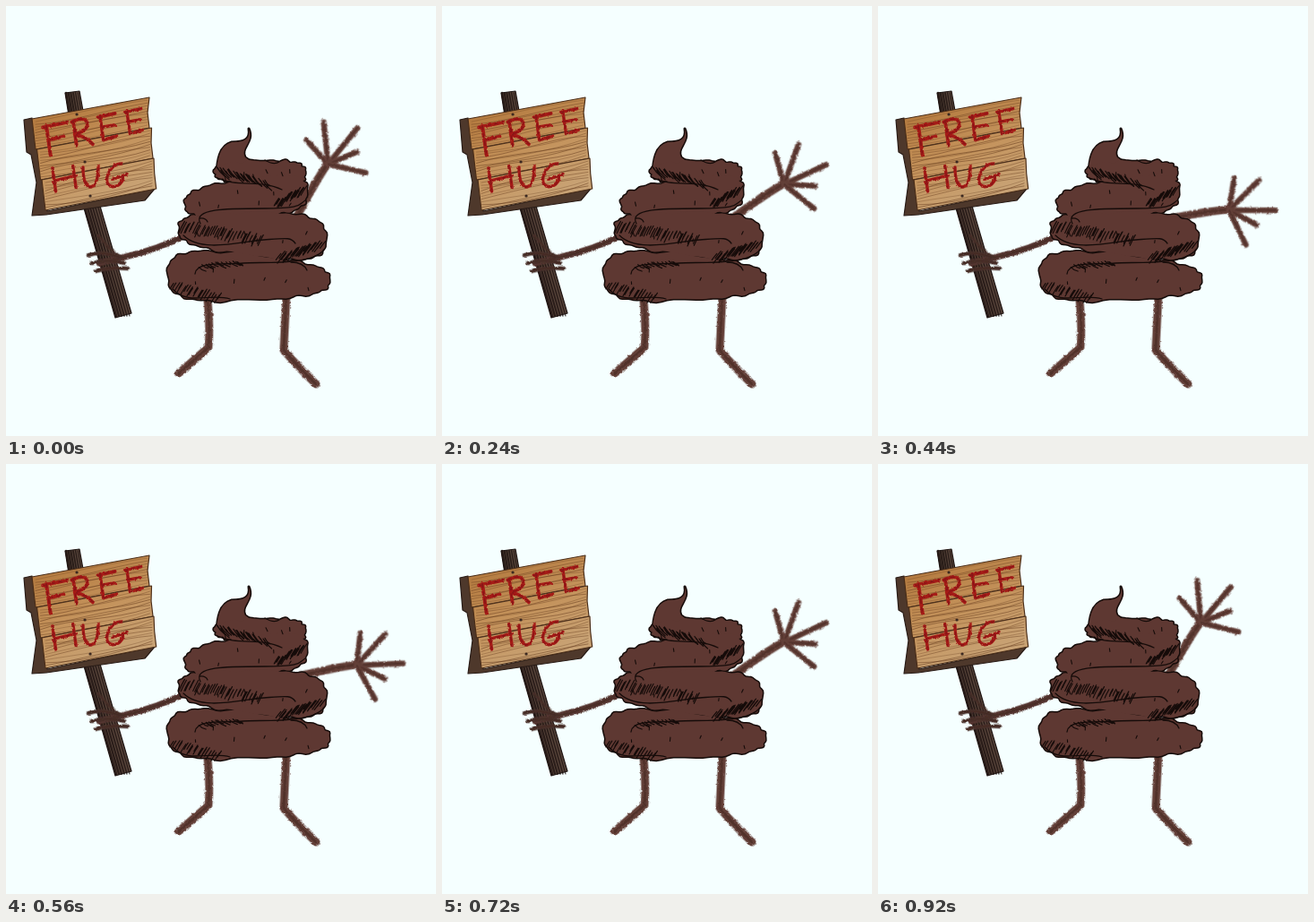
Animation of 480 by 480 pixels, one loop 960 ms. Source, as an HTML page:

```html
<!DOCTYPE html>
<html lang="en">
<head>
<meta charset="utf-8">
<title>Free hug</title>
<style>
html, body { margin: 0; width: 100%; height: 100%; overflow: hidden; background: #f5ffff; }
svg { display: block; width: 100vw; height: 100vh; }
path { stroke-linecap: round; stroke-linejoin: round; }
</style>
</head>
<body>
<svg viewBox="0 0 480 480">
  <defs>
    <filter id="chalk" filterUnits="userSpaceOnUse" x="0" y="0" width="480" height="480">
      <feTurbulence type="fractalNoise" baseFrequency=".3" numOctaves="2" seed="4"/>
      <feDisplacementMap in="SourceGraphic" scale="3" xChannelSelector="R" yChannelSelector="G"/>
      <feGaussianBlur stdDeviation=".6"/>
    </filter>
    <linearGradient id="wood" gradientUnits="userSpaceOnUse" x1="70" y1="115" x2="115" y2="215">
      <stop offset="0" stop-color="#b67d42"/>
      <stop offset=".5" stop-color="#c4935c"/>
      <stop offset="1" stop-color="#c8a274"/>
    </linearGradient>
  </defs>
  <g id="pole"></g>
  <g id="sign"></g>
  <g id="paint" filter="url(#chalk)" aria-label="FREE HUG"></g>
  <g id="limbs" filter="url(#chalk)"></g>
  <g id="wave"><g id="hand" filter="url(#chalk)"></g></g>
  <g id="body"></g>
</svg>
<script>
const $ = id => document.getElementById(id);
const INK = '#150b09', BROWN = '#5e3832', LIMB = '#633f38', GRIP = '#48302a', RED = '#a51a18';

let seed = 11;
const rnd = () => (seed = (seed * 16807) % 2147483647) / 2147483647;
const jit = a => (rnd() - .5) * 2 * a;
const mix = (a, b, t) => a + (b - a) * t;

function draw(id, d, stroke, width = 1, fill = 'none', opacity = 1) {
  const p = document.createElementNS('http://www.w3.org/2000/svg', 'path');
  const attrs = { d, stroke, 'stroke-width': width, fill, opacity };
  for (const k in attrs) p.setAttribute(k, attrs[k]);
  $(id).append(p);
  return p;
}

// Square post with grain along its length
function post(x0, y0, x1, y1, w) {
  draw('pole', `M${x0},${y0}l${w},-2L${x1 + w},${y1 - 5} ${x1},${y1}Z`, '#1d1311', 1.2, '#57443a');
  for (let i = 0; i < 6; i++) {
    const k = w * i / 6 + 1;
    draw('pole', `M${x0 + k},${y0}L${x1 + k},${y1 - 2}`, '#211613', 2.4 - i * .25, 'none', .85);
  }
}

function plank(i) {
  const l = 29 + 5.5 * i, r = 160 + 2.5 * i, top = 126 + 34 * i, h = 34, rise = -24;
  draw('sign', `M${l},${top}L${r},${top + rise}l${jit(2)},${h / 2} 2,${h / 2}L${l + 4},${top + h}Z`,
    '#4a2d18', 1.2, 'url(#wood)');
  for (let n = 1; n < 11; n++) {
    const y = top + h * n / 11, span = r - l - 6;
    draw('sign', `M${l + 4},${y}c${span * .3},${rise * .3 + jit(7)} ${span * .65},${rise * .65 + jit(7)} ${span},${rise}`,
      '#63391c', .5 + rnd() * .5, 'none', .55);
  }
}

// Letter strokes in a 24 by 32 box
const GLYPHS = {
  F: 'M1,0L0,33M-3,1L24,0M1,16L18,15',
  R: 'M1,0L0,29M-1,1Q15,-4 17,5 17,14 0,16Q12,20 19,31',
  E: 'M1,0L0,30M-2,1L20,0M1,14L17,14M0,30L17,28',
  H: 'M1,0L0,31M-1,17L30,15M28,2L27,31',
  U: 'M0,0Q-4,22 4,27 15,29 20,2',
  G: 'M21,0Q7,-2 -1,13 -6,26 5,28 17,28 20,15M5,18L25,15'
};

function letter(name, x, y, size) {
  const place = `translate(${x} ${y}) rotate(-10) scale(${size})`;
  draw('paint', GLYPHS[name], RED, 4).setAttribute('transform', place);
  const dry = draw('paint', GLYPHS[name], '#7c1112', 1.5, 'none', .7);
  dry.setAttribute('transform', place);
  dry.setAttribute('stroke-dasharray', '4 5');
}

function buildSign() {
  post(66, 97, 70, 122, 16);
  post(86, 222, 122, 348, 18);
  draw('sign', 'M20,127L29,125 46,229 166,204 155,217 45,233 29,234 34,197 28,166 23,163Z',
    '#281b16', 1.2, '#4e382b');
  for (let i = 0; i < 3; i++) plank(i);
  draw('sign', 'M79,121h.1M88,174h.1M94,212h.1', '#3b2820', 3.2);
  [...'FREE'].forEach((c, i) => letter(c, 44 + 30 * i, 134 - 5.5 * i, 1 - .05 * i));
  [...'HUG'].forEach((c, i) => letter(c, [51, 86, 112][i], 181 - i, .85));
}

function limb(id, d, width, color = LIMB) {
  draw(id, d, color, width + 2, 'none', .45);
  draw(id, d, color, width);
  draw(id, d, '#40251f', width * .35, 'none', .5);
}

function buildLimbs() {
  limb('limbs', 'M225,328Q228,356 226,381L193,410', 8);
  limb('limbs', 'M313,322L310,384Q325,402 346,422', 8);
  limb('limbs', 'M202,255Q170,272 129,281L104,287', 6, '#553630');
  limb('limbs', 'M103,256Q114,271 128,280', 2, GRIP);
  for (let i = 0; i < 3; i++)
    limb('limbs', `M${92 + 4 * i},${278 + 9 * i}q17,-5 36,${3 - 3 * i}`, 3.5, GRIP);

  limb('hand', 'M322,238L345,234Q368,230 393,228', 8);
  const fingers = [[-80, 36], [-44, 47], [1, 52], [29, 35], [65, 43]];
  for (const [deg, len] of fingers) {
    const a = deg * Math.PI / 180;
    limb('hand', `M392,229l${len * Math.cos(a)},${len * Math.sin(a)}`, 5.5);
  }
}

// Coils, top to bottom: each end has x, centre y and half height
const COILS = [
  { l: [233, 185, 11], r: [334, 187, 15] },
  { l: [200, 221, 17], r: [336, 207, 25] },
  { l: [193, 249, 19], r: [357, 260, 29] },
  { l: [181, 300, 32], r: [361, 306, 18] }
];
const along = (c, t) => c.l.map((v, i) => mix(v, c.r[i], t));

// Lumpy superellipse
function coilPath(c) {
  const pow = v => Math.sign(v) * Math.abs(v) ** (2 / 3);
  const phase = rnd() * 6;
  let d = '';
  for (let i = 0; i < 120; i++) {
    const a = i / 120 * 2 * Math.PI, lump = Math.sin(a * 13 + phase) + Math.sin(a * 22 + phase * 2);
    const [x, y, h] = along(c, (1 + pow(Math.cos(a))) / 2);
    d += `${i ? 'L' : 'M'}${x + lump * .7 * Math.cos(a)},${y + pow(Math.sin(a)) * h + lump * .9 * Math.sin(a)}`;
  }
  return d + 'Z';
}

// Row of n pen strokes starting along a line, each running by (dx, dy)
function hatch(n, x0, y0, x1, y1, dx, dy) {
  let d = '';
  for (let i = 0; i < n; i++) {
    const t = i / (n - 1), k = .7 + rnd() * .6;
    d += `M${mix(x0, x1, t) + jit(2)},${mix(y0, y1, t) + jit(2)}`
       + `q${dx * k / 2 - 1},${dy * k / 2 + 1} ${dx * k},${dy * k}`;
  }
  draw('body', d, INK, 1.2);
}

function buildBody() {
  const wisp = 'M235,186C236,172 238,156 252,152C266,152 273,149 271,137C278,152 261,158 267,169L277,176 270,195Z';
  const shapes = [wisp, ...COILS.map(coilPath)];
  for (const d of shapes) draw('body', d, INK, 3, BROWN);
  for (const d of shapes) draw('body', d, 'none', 0, BROWN);

  // Creases between the coils
  draw('body', 'M236,192C258,203 284,193 308,205M289,172q10,6 16,2', INK, 1.3);
  draw('body', 'M217,243C208,226 245,226 288,226S326,222 334,217M216,237q7,-1 9,4', INK, 1.3);
  draw('body', 'M198,256C218,276 262,263 288,261S318,258 323,265', INK, 1.3);
  draw('body', 'M211,299C212,284 248,289 265,287S340,291 355,272M318,286q14,0 18,9', INK, 1.3);
  draw('body', 'M186,316C204,335 228,320 250,327', INK, 1.3);

  hatch(28, 234, 180, 290, 195, 8, 9);
  hatch(28, 334, 202, 302, 217, -5, 8);
  hatch(38, 200, 241, 286, 256, -5, 10);
  hatch(34, 355, 262, 308, 277, -7, 9);
  hatch(16, 216, 290, 258, 284, 7, 4);
  hatch(22, 188, 308, 240, 322, -5, 8);

  // Short surface ticks
  for (const c of COILS) for (let i = 1; i < 7; i++) {
    const [x, y, h] = along(c, (i + jit(.3)) / 7);
    draw('body', `M${x},${y + jit(h * .5)}l${jit(2)},${2.5 + rnd() * 2}`, INK, 1.1);
  }
}

const LOOP = 960, STEP = 40, SWING = 26;

function render(ms) {
  const t = Math.floor((ms % LOOP) / STEP) * STEP;
  const angle = -SWING * (1 + Math.cos(2 * Math.PI * t / LOOP));
  $('wave').setAttribute('transform', `rotate(${angle.toFixed(2)} 322 236)`);
}

buildSign();
buildLimbs();
buildBody();
render(0);

let start;
function tick(now) {
  start ??= now;
  render(now - start);
  requestAnimationFrame(tick);
}
requestAnimationFrame(tick);
</script>
</body>
</html>
```
